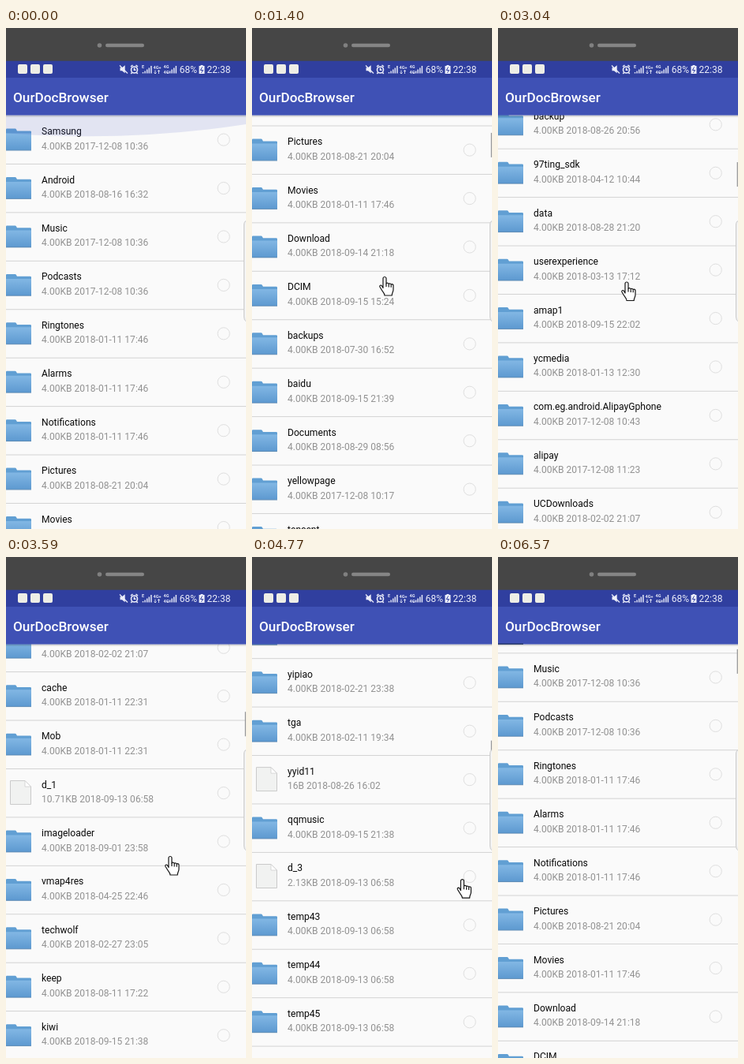
Recreate the animation shown at these times as an HTML page. Size 304 by 635 pixels, loop 8500 ms.

```html
<!DOCTYPE html>
<html lang="en">
<head>
<meta charset="utf-8">
<title>File list</title>
<style>
  html, body { margin: 0; width: 100%; height: 100%; overflow: hidden; background: #fafafa; }
  svg { display: block; width: 304px; height: 635px; font-family: Roboto, sans-serif; }
  .name { font-size: 12.12px; fill: #0a0a0a; }
  .info { font-size: 12.05px; fill: #929292; }
  .status { font-size: 12px; fill: #eceefa; }
  .tiny { font-size: 5.5px; font-weight: 700; fill: #e4e7f7; }
</style>
</head>
<body>
<svg viewBox="0 0 304 635">
  <defs>
    <linearGradient id="front" x2="0" y2="1">
      <stop stop-color="#82b7e4"/><stop offset="1" stop-color="#5d99d0"/>
    </linearGradient>
    <linearGradient id="shade" x2="0" y2="1">
      <stop stop-color="#000" stop-opacity=".22"/><stop offset="1" stop-color="#000" stop-opacity="0"/>
    </linearGradient>
    <g id="folder">
      <path d="M0 44V18.2Q0 17 1.2 17H11.5Q12.5 17 13 18L14 19.8H30.6Q32 19.8 32 21V44Z" fill="#619fd3"/>
      <path d="M0 23H32V43.2Q32 44.2 31 44.2H1Q0 44.2 0 43.2Z" fill="url(#front)"/>
      <path d="M0 44.4H32" stroke="#4b7ca9" stroke-width=".8"/>
    </g>
    <g id="file">
      <path d="M5.5 15.5H24L31.5 23V45.5H5.5Z" fill="#f1f2f1" stroke="#cacaca"/>
      <path d="M24 15.5V23H31.5Z" fill="#fff" stroke="#cfcfcf" stroke-width=".8"/>
    </g>
    <path id="bars" d="M0 10V8.5M2.6 10V7M5.2 10V5M7.8 10V3M10.4 10V.5" stroke="#e4e7f7" stroke-width="1.5"/>
    <rect id="badge" y="46" width="12" height="12" rx="2" fill="#eeeee6"/>
  </defs>

  <rect width="304" height="635" fill="#fafafa"/>
  <g id="list"></g>
  <path id="glow" d="M0 0H304V11Q200 27 95 26.2Q40 26 0 22Z" fill="#3f51b5" fill-opacity=".13"/>
  <rect y="110.6" width="304" height="3" fill="url(#shade)"/>
  <rect id="thumb" x="302.6" width="1.4" height="31" fill="#a0a0a0"/>
  <path d="M304.5 244.5Q301.5 245 301.5 250V366Q301.5 371 304.5 372" fill="#f3f3f3" stroke="#c9c9c9"/>

  <rect width="304" height="42" fill="#464646"/>
  <circle cx="118.5" cy="22" r="2.8" fill="#808080"/>
  <rect x="126" y="19.7" width="49" height="4.6" rx="2.3" fill="#858585"/>

  <rect y="41.7" width="304" height="21.3" fill="#303f9f"/>
  <use href="#badge" x="15"/><use href="#badge" x="31"/><use href="#badge" x="47"/>
  <path d="M144.5 50.3H147L150.7 47.3V57.3L147 54.3H144.5Z" fill="#eceefa"/>
  <path d="M144 47.5L154 57.5" stroke="#eceefa" stroke-width="1.3"/>
  <g fill="none" stroke="#eceefa" stroke-width="1.6">
    <circle cx="162.5" cy="53" r="4"/>
    <path d="M162.5 50.5V53.2H164.5M158 49L160.5 47M167 49L164.5 47M159.5 56.5L158.3 58M165.5 56.5L166.7 58"/>
  </g>
  <use href="#bars" x="173.5" y="47.5"/>
  <text class="tiny" x="172" y="51">E</text>
  <text class="tiny" x="186.5" y="52">4G+</text>
  <path d="M189 53.5V58M187.5 56.5L189 58L190.5 56.5M193.5 58V53.5M192 55L193.5 53.5L195 55" fill="none" stroke="#e4e7f7" stroke-width=".9"/>
  <use href="#bars" x="205" y="47.5"/>
  <text class="tiny" x="199.5" y="51">4G</text>
  <text class="tiny" x="199.5" y="58">4G</text>
  <text class="status" x="219.8" y="57">68%</text>
  <path d="M246.5 47H249.5V48H251.5V58H244.5V48H246.5Z" fill="#eceefa"/>
  <path d="M248.6 49.5L246.3 53.5H249.6L247.5 56.7" fill="none" stroke="#303f9f"/>
  <text class="status" x="254.5" y="57">22:38</text>

  <rect y="63" width="304" height="47.6" fill="#3f51b5"/>
  <text x="9" y="94" font-size="17.2" font-weight="500" fill="#fff">OurDocBrowser</text>
  <rect id="sliver" y="109.5" width="32" height="1.5" fill="#2c3d6e"/>

  <g id="hand" stroke="#151515" stroke-width="1.2" stroke-linejoin="round">
    <path fill="#fff" d="M-2 2a2 2 0 0 1 4 0v6.5a1.8 1.8 0 0 1 3.2.5a1.8 1.8 0 0 1 3 .8a1.6 1.6 0 0 1 2.8 1.2v5c0 3-1.8 4-1.8 7.5H0c0-3-2.5-4.5-4-7.5l-2-3.2c-1-2 1.2-3 2.4-1.6L-2 14Z"/>
    <path fill="none" d="M2 8.5v4M5.2 9.5v3.5M8.2 10.3v3"/>
  </g>
</svg>
<script>
const LOOP = 8500, PITCH = 61.43, TOP = 110.6, ROWS = 50;

// name, month and day, hour and minute, size of a plain file;
// a missing date repeats the one before
const listing = `Samsung 1208 1036, Android 0816 1632, Music 1208 1036, Podcasts,
  Ringtones 0111 1746, Alarms, Notifications, Pictures 0821 2004, Movies 0111 1746,
  Download 0914 2118, DCIM 0915 1524, backups 0730 1652, baidu 0915 2139,
  Documents 0829 0856, yellowpage 1208 1017, tencent 0915 2140, tbs 1208 1021,
  QQBrowser 0915 2209, backup 0826 2056, 97ting_sdk 0412 1044, data 0828 2120,
  userexperience 0313 1712, amap1 0915 2202, ycmedia 0113 1230,
  com.eg.android.AlipayGphone 1208 1043, alipay 1208 1123, UCDownloads 0202 2107,
  cache 0111 2231, Mob, d_1 0913 0658 10.71KB, imageloader 0901 2358,
  vmap4res 0425 2246, techwolf 0227 2305, keep 0811 1722, kiwi 0915 2138,
  test 1208 1442, iApp 0902 0616, com.duowan.kiwi 0811 1822, yipiao 0221 2338,
  tga 0211 1934, yyid11 0826 1602 16B, qqmusic 0915 2138, d_3 0913 0658 2.13KB`
  .split(",").map(entry => entry.trim().split(" "));
while (listing.length < ROWS) listing.push(["temp" + listing.length]);

const $ = id => document.getElementById(id);
const pair = (digits, mark) => digits.slice(0, 2) + mark + digits.slice(2);

let lastDay, lastTime;
$("list").innerHTML = listing.map(([name, day = lastDay, time = lastTime, size], i) => {
  [lastDay, lastTime] = [day, time];
  const year = day.startsWith("12") ? 2017 : 2018;
  return `<g transform="translate(0 ${(i * PITCH).toFixed(2)})">
    <use href="#${size ? "file" : "folder"}"/>
    <text class="name" x="45" y="24.5">${name}</text>
    <text class="info" x="45" y="43">${size || "4.00KB"} ${year}-${pair(day, "-")} ${pair(time, ":")}</text>
    <circle cx="275.7" cy="31" r="7.6" fill="none" stroke="#dfdfdf"/>
    <path d="M0 ${PITCH + .4}H304" stroke="#d3d3d3"/>
  </g>`;
}).join("");

// the list and pointer move from key to key in even, held steps
const keys = [
  { at: 392, scroll: 0, x: 172, y: 600 },
  { at: 1400, scroll: 417, x: 168, y: 315.5, steps: 13 },
  { at: 2180, scroll: 654, x: 163, y: 322, steps: 5 },
  { at: 3040, scroll: 1125, x: 163, y: 322, steps: 5 },
  { at: 4060, scroll: 2123, x: 253, y: 437, steps: 12 },
  { at: 4450, scroll: 2490, x: 256, y: 430, steps: 5 },
  { at: 5630, scroll: 1710, x: 303, y: 334, steps: 9 },
  { at: 6570, scroll: 112, x: 345, y: 320, steps: 11 }
];

function pose(t) {
  const next = keys.findIndex(key => key.at > t);
  if (next < 0) return keys.at(-1);
  if (next === 0) return keys[0];
  const a = keys[next - 1], b = keys[next];
  const part = Math.floor((t - a.at) / (b.at - a.at) * b.steps) / b.steps;
  const mix = prop => a[prop] + (b[prop] - a[prop]) * part;
  return { scroll: mix("scroll"), x: mix("x"), y: mix("y") };
}

const show = (id, on) => $(id).setAttribute("visibility", on ? "visible" : "hidden");
const move = (id, x, y, extra = "") => $(id).setAttribute("transform", `translate(${x} ${y})${extra}`);

function draw(t) {
  const { scroll, x, y } = pose(t);
  const touched = scroll > 0;
  move("list", 0, TOP - scroll);
  move("hand", x, y);
  move("glow", 0, 111, ` scale(1 ${t < 70 ? 1 : t < 90 ? .75 : .55})`);
  $("thumb").setAttribute("y", 111 + scroll * .0525);
  show("hand", t >= 90);
  show("glow", !touched);
  show("thumb", touched);
  show("sliver", t >= keys.at(-1).at);
}

const began = performance.now();
function tick() {
  draw((performance.now() - began) % LOOP);
  requestAnimationFrame(tick);
}
tick();
</script>
</body>
</html>
```
